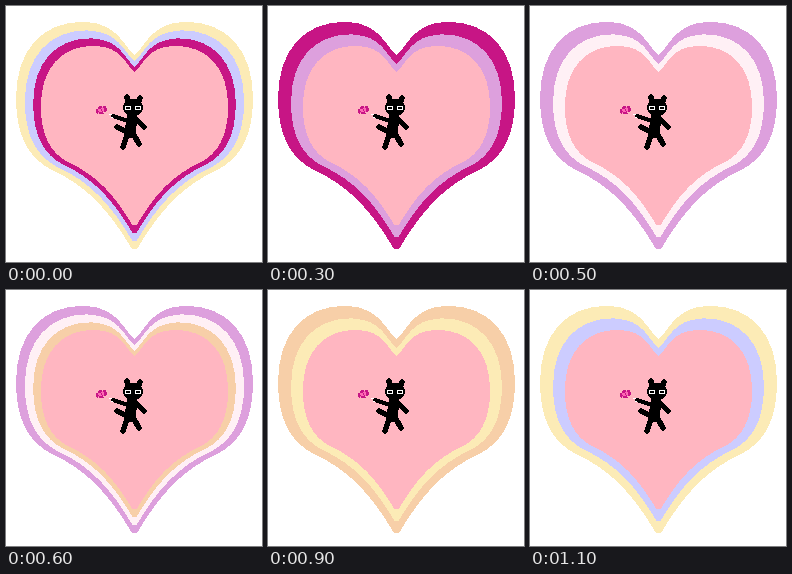
An HTML page that plays this animation: 256 px wide and 256 px high, repeating every 1.2 s.

```html
<!DOCTYPE html>
<html lang="en">
<head>
<meta charset="utf-8">
<title>Heart pulse</title>
<style>
  html, body { margin: 0; width: 100%; height: 100%; overflow: hidden; background: #fff; }
  svg { display: block; width: 100vw; height: 100vh; shape-rendering: crispEdges; }

  /* Every ring is the same heart, scaled about its centre */
  .heart { transform-origin: 128.5px 130px; transform: scale(var(--size, 1)); }
  .core { --size: 0.79; fill: #ffb6c1; }

  /* Each ring runs one colour ahead of the ring around it */
  .ring {
    animation: cycle 1200ms step-end infinite;
    animation-delay: calc(-100ms - 200ms * var(--depth));
  }
  .two { animation: blink 200ms step-end infinite -100ms; }
  .three { animation: blink 200ms step-end infinite; }

  @keyframes cycle {
    0% { fill: #fcebb6; }
    16.666% { fill: #ccccff; }
    33.333% { fill: #c71585; }
    50% { fill: #dda0dd; }
    66.666% { fill: #fff0f5; }
    83.333% { fill: #f7cfa8; }
  }
  @keyframes blink {
    0% { visibility: visible; }
    50%, 100% { visibility: hidden; }
  }

  .limbs { fill: none; stroke: #000; stroke-width: 5.5; stroke-linecap: round; }
  .eyes { fill: none; stroke: #fff; }
  .petals { fill: #ff69b4; stroke: #c71585; stroke-width: 2.5; stroke-dasharray: 4 1; }
</style>
</head>
<body>
<svg viewBox="0 0 256 256">
  <defs>
    <path id="half" d="M129 50C116 38 112 18 80 16C39 14 10 42 10 92C10 132 24 152 44 163C82 180 104 206 126 243H129Z"/>
    <g id="heart">
      <use href="#half"/>
      <use href="#half" transform="translate(257) scale(-1 1)"/>
    </g>
  </defs>

  <use href="#heart" class="heart ring" style="--depth: 0"/>
  <g class="two">
    <use href="#heart" class="heart ring" style="--depth: 1; --size: 0.89"/>
  </g>
  <g class="three">
    <use href="#heart" class="heart ring" style="--depth: 1; --size: 0.925"/>
    <use href="#heart" class="heart ring" style="--depth: 2; --size: 0.855"/>
  </g>
  <use href="#heart" class="heart core"/>

  <g id="cat">
    <ellipse cx="127" cy="101.5" rx="10" ry="9"/>
    <g class="limbs">
      <path d="M121 91L122 97M134 92L132 97"/>
      <path d="M126 112L124 127" stroke-width="11"/>
      <path d="M119 114L107 110" stroke-width="4"/>
      <path d="M119 125L111 121M130 113L138 121M121 129L117 141M128 129L133 138"/>
    </g>
    <g class="eyes">
      <ellipse cx="122" cy="102" rx="3" ry="2"/>
      <ellipse cx="132" cy="102" rx="3" ry="2"/>
      <path d="M103 108H106M105 111H107"/>
    </g>
  </g>

  <g id="flower">
    <ellipse class="petals" cx="95.5" cy="104" rx="4.5" ry="3" transform="rotate(-20 95.5 104)"/>
    <circle cx="95.5" cy="104" r="1" fill="#c71585"/>
  </g>
</svg>
</body>
</html>
```
